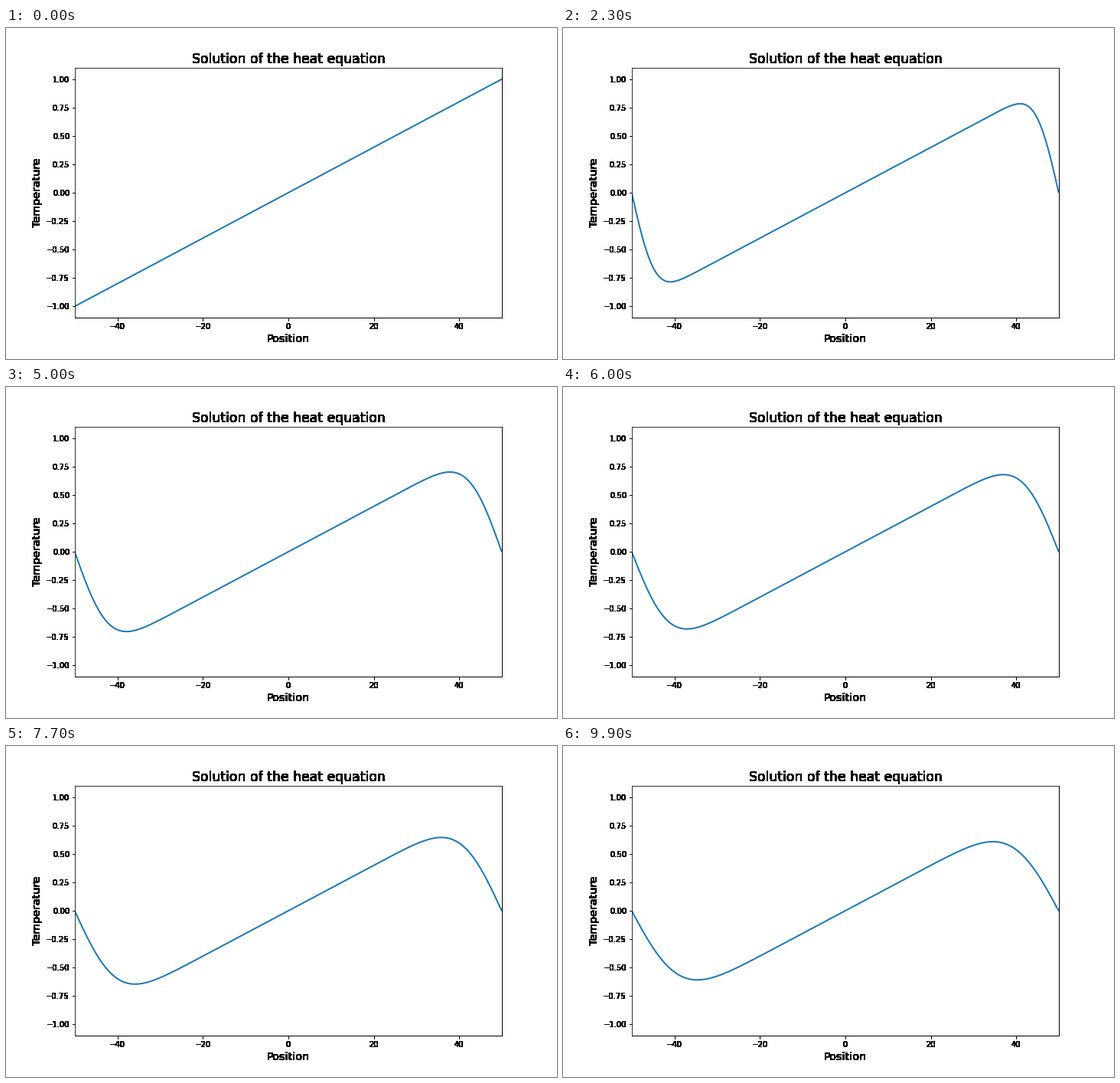
Write a matplotlib script that moves like this. It is 720 px wide and 432 px high and loops after 10000 ms.

```python
import numpy as np
import matplotlib.pyplot as plt
from matplotlib.animation import FuncAnimation

LENGTH, N = 100, 1000
DIFFUSION = 4.0
DT = 0.1
FRAMES = 100

dx = LENGTH / N
x = (np.arange(N) - N // 2) * dx
k = 2 * np.pi * np.fft.rfftfreq(N, d=dx)
start_hat = np.fft.rfft(2 * x / LENGTH)


def temperature(t):
    """Spectral solution of u_t = D u_xx on a periodic rod."""
    return np.fft.irfft(start_hat * np.exp(-DIFFUSION * k**2 * t), N)


def harden(img, dpi):
    """Turn every touched pixel solid black."""
    out = np.zeros_like(img)
    out[..., 3] = img[..., 3] > 0
    return out, 0, 0


plt.rcParams.update({"font.family": "DejaVu Sans", "font.size": 10})
fig, ax = plt.subplots(figsize=(10, 6), dpi=72, facecolor="white")
fig.subplots_adjust(left=0.125, right=0.9, bottom=0.125, top=0.88)

ax.set_xlim(-LENGTH / 2, LENGTH / 2)
ax.set_ylim(-1.1, 1.1)
ax.set_xticks(np.arange(-40, 41, 20))
ax.set_yticks(np.linspace(-1, 1, 9))
ax.set_title("Solution of the heat equation", fontsize="xx-large")
ax.set_xlabel("Position", fontsize="x-large")
ax.set_ylabel("Temperature", fontsize="x-large")

for part in (ax.title, ax.xaxis, ax.yaxis, ax.spines["right"], ax.spines["bottom"]):
    part.set_agg_filter(harden)

line, = ax.plot(x, temperature(0), color="tab:blue", lw=2)


def update(i):
    line.set_ydata(temperature(i * DT))
    return line,


anim = FuncAnimation(fig, update, frames=FRAMES, interval=100,
                     repeat=True, repeat_delay=0)
plt.show()
```
